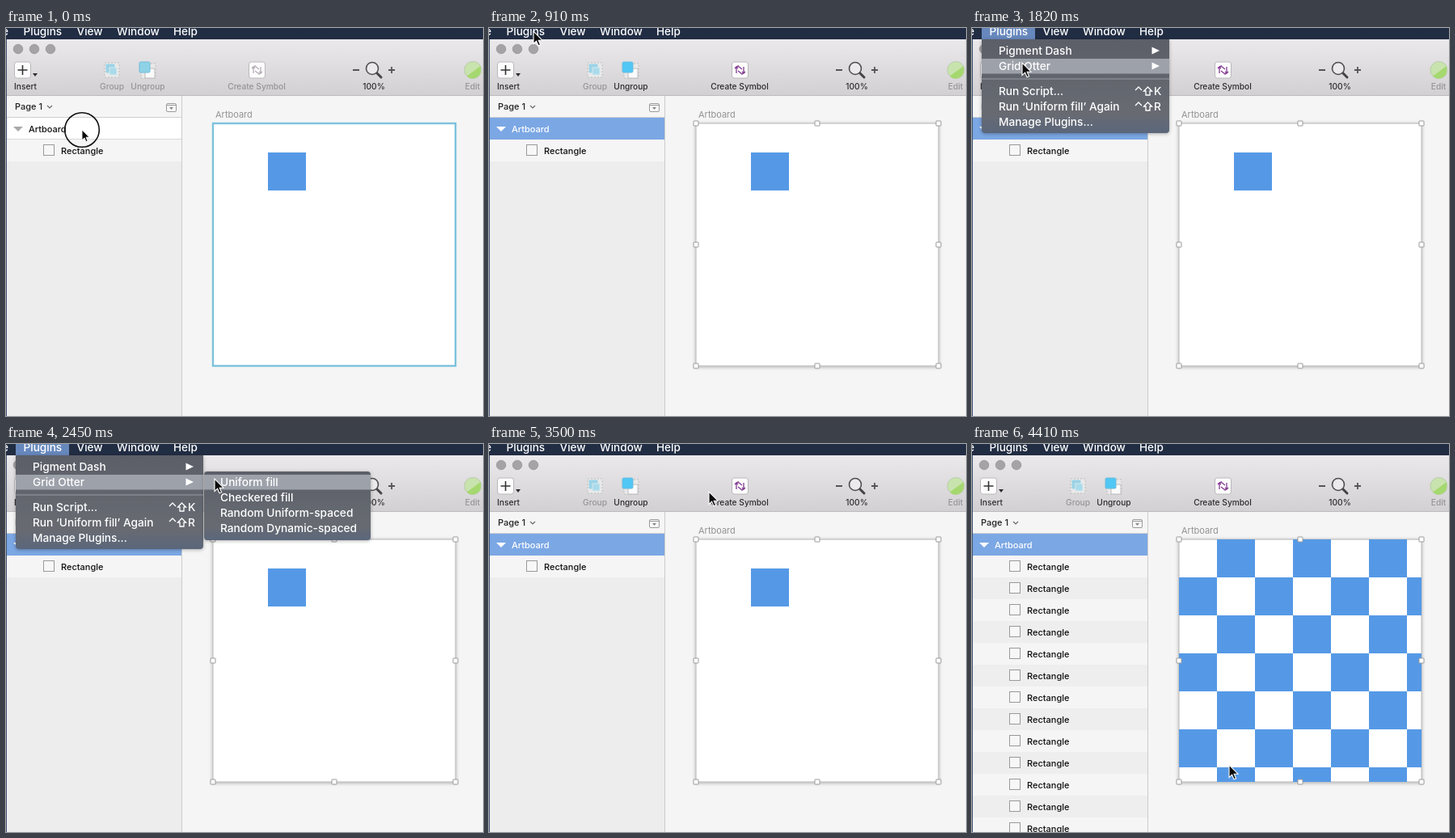
Write an HTML page that moves like this. It is 590 by 480 pixels and loops after 4480 ms.

```html
<!DOCTYPE html>
<html lang="en">
<head>
<meta charset="utf-8">
<title>Checkered fill</title>
<style>
  html, body { margin: 0; width: 100%; height: 100%; overflow: hidden; background: #f5f5f5; }
  svg { display: block; width: 590px; height: 480px; }
  text { font-family: Inter, "Open Sans", sans-serif; white-space: pre; }
</style>
</head>
<body>
<svg id="stage" viewBox="0 0 590 480">
  <defs>
    <linearGradient id="bar" x2="0" y2="1">
      <stop stop-color="#ebe9eb"/><stop offset="1" stop-color="#d2d0d2"/>
    </linearGradient>
    <linearGradient id="glass" x2="0" y2="1">
      <stop stop-color="#5b5f68"/><stop offset=".8" stop-color="#686b72"/>
      <stop offset="1" stop-color="#5a667b"/>
    </linearGradient>
    <filter id="shadow" x="-10%" y="-10%" width="120%" height="125%">
      <feDropShadow dx="0" dy="1" stdDeviation="2" flood-opacity=".3"/>
    </filter>
    <clipPath id="board"><rect x="256" y="118" width="300" height="300"/></clipPath>
  </defs>
  <g id="scene"></g>
</svg>
<script>
const LOOP = 4480, STEP = 70;
const BLUE = '#5599e6';
const SELECT = 140, OPEN = 1190, SUBMENU = 1890, CLOSE = 3290, FILL = 3780;
const pointer = [
  [0, 94, 126], [225, 94, 126], [840, 55, 4], [1540, 55, 4], [1820, 62, 43], [1960, 62, 43],
  [2240, 225, 43], [2450, 258, 43], [2590, 258, 43], [2730, 272, 59], [3570, 272, 59],
  [4130, 318, 397], [LOOP, 318, 397]
];

const rect = (x, y, w, h, fill, more = '') =>
  `<rect x="${x}" y="${y}" width="${w}" height="${h}" fill="${fill}" ${more}/>`;
const path = (d, fill, stroke = 'none', more = '') =>
  `<path d="${d}" fill="${fill}" stroke="${stroke}" ${more}/>`;
const circle = (x, y, r, fill, more = '') =>
  `<circle cx="${x}" cy="${y}" r="${r}" fill="${fill}" ${more}/>`;
const text = (s, x, y, size, fill, more = '') =>
  `<text x="${x}" y="${y}" font-size="${size}" fill="${fill}" ${more}>${s}</text>`;
const label = (s, x, fill) => text(s, x, 76, 10.2, fill, 'text-anchor="middle" font-weight="450"');

function pointerAt(t) {
  const i = pointer.findIndex(k => k[0] > t);
  const [t0, x0, y0] = pointer[i - 1], [t1, x1, y1] = pointer[i];
  const u = (t - t0) / (t1 - t0), e = u * u * (3 - 2 * u);
  return [x0 + (x1 - x0) * e, y0 + (y1 - y0) * e];
}

function menuBar(open) {
  const names = [['e', -5], ['Plugins', 21.5], ['View', 87.5], ['Window', 137], ['Help', 207]];
  return rect(0, 0, 590, 14, '#212d43') + (open ? rect(12, 0, 66, 14, '#6788bd') : '') +
    names.map(([s, x]) => text(s, x, 9, 13.6, '#fff', 'font-weight="500"')).join('');
}

function toolbar(selected) {
  const dim = '#969496', dark = '#2c2c2c', on = selected ? dark : dim;
  const purple = selected ? '#843c94' : '#b5adb7';
  const button = x => rect(x, 42, 20, 20, '#fcfcfc', 'rx="3" stroke="#bab8ba"');
  const corners = (x, y) => rect(x, y, 18, 18, '#e9e9e9', 'stroke="#bdbdbd" stroke-dasharray="2 2"');
  return rect(1, 14, 589, 69, 'url(#bar)') + rect(1, 83, 589, 1, '#bcbabc') +
    [15, 35, 55].map(x => circle(x, 26, 5.8, '#a5a3a5', 'stroke="#929092" stroke-width=".7"')).join('') +
    button(10.5) + path('M14.5 52h12M20.5 46v12', 'none', '#333', 'stroke-width="1.6"') +
    path('M33 56h6l-3 4z', dark) + label('Insert', 24, dark) +
    corners(122, 43) + rect(123.5, 44.5, 11, 11, '#9bd3e6', 'rx="1"') +
    rect(128, 49, 9, 9, '#a9dbeb', 'stroke="#d9e8ed"') + label('Group', 131, dim) +
    corners(167, 44) + rect(172, 50, 12, 12, '#fafafa', 'stroke="#bbb"') +
    rect(165, 42, 13, 13, selected ? '#50c7f5' : '#8ed2e6', 'rx="1.5" stroke="#6ebbdc"') +
    label('Ungroup', 175.5, on) +
    button(300.5) +
    path('M306 56v-6q0-3 3-3M304 50l2-2 2 2M315 48v6q0 3-3 3M313 54l2 2 2-2M308 47l5 4M308 53l5 4',
      'none', purple, 'stroke-width="1.3"') +
    label('Create Symbol', 310, on) +
    path('M429 52h8M473 52h8M477 48v8', 'none', '#555', 'stroke-width="1.8"') +
    path('M458 55l6 6', 'none', '#444', 'stroke-width="3" stroke-linecap="round"') +
    circle(453, 50, 7.5, '#eceaec', 'stroke="#505050" stroke-width="1.6"') + label('100%', 455, dark) +
    circle(577.5, 52, 10.5, '#c9e3ae', 'stroke="#b9cda8"') +
    path('M570 59.5A10 10 0 0 0 587 52V47z', '#a5d86f') + label('Edit', 577, dim);
}

function sidebar(selected, filled) {
  let s = rect(1, 84, 216, 396, '#ededee') + rect(1, 84, 216, 26, '#f5f5f5') +
    rect(1, 110, 216, 1, '#d0d0d0') + text('Page 1', 11, 101, 11, '#222', 'font-weight="450"') +
    path('M51 96l3 3 3-3', 'none', '#666', 'stroke-width="1.2"') +
    rect(198.5, 93.5, 12, 10, '#f8f8f8', 'rx="1.5" stroke="#9a9a9a"') +
    path('M198.5 95.5h12', 'none', '#9a9a9a') + path('M202 98h5l-2.5 3z', '#888') +
    rect(1, 111, 216, 27, selected ? '#7ba7e4' : '#fff') +
    (selected ? '' : rect(1, 137, 216, 1, '#d8d8d8')) +
    path('M9 122h12l-6 6z', selected ? '#fff' : '#a9a9a9') +
    text('Artboard', 28, 129, 11, selected ? '#fff' : '#111', 'font-weight="500"');
  for (let i = 0; i < (filled ? 13 : 1); i++) {
    const y = 138 + 27 * i;
    s += rect(1, y, 216, 27, i % 2 ? '#eeeeee' : '#f5f5f5') +
      rect(46.5, y + 6.5, 13, 13, '#f7f7f7', 'stroke="#999"') +
      text('Rectangle', 68, y + 18, 11, '#111', 'font-weight="500"');
  }
  return s + rect(217, 84, 1, 396, '#cbcbcb');
}

function artboard(selected, filled) {
  let s = text('Artboard', 259, 111, 11, '#929292') +
    rect(256, 118, 300, 300, '#fff', selected ? 'stroke="#b5b5b5" filter="url(#shadow)"'
      : 'stroke="#7dc2dd" stroke-width="2.4"');
  if (filled) {
    s += '<g clip-path="url(#board)">';
    for (let i = 0; i < 49; i++)
      if (i % 2) s += rect(256 + i % 7 * 47, 118 + Math.floor(i / 7) * 47, 47, 47, BLUE);
    s += '</g>';
  } else s += rect(324, 154, 47, 47, BLUE);
  if (selected)
    for (const x of [256, 406, 556])
      for (const y of [118, 268, 418])
        if (x !== 406 || y !== 268)
          s += rect(x - 3, y - 3, 6, 6, '#fff', 'stroke="#999" rx=".5"');
  return s;
}

function menus(t, x, y) {
  const item = (s, x, y) => text(s, x, y + 5, 13.7, '#fff', 'font-weight="500"');
  const light = (x, y, w) => rect(x, y, w, 18.5, '#9da1aa');
  const hover = t >= 1750;
  let s = `<g opacity="${t < CLOSE ? 1 : .5}">` +
    path('M12 14H244V126q0 4-4 4H16q-4 0-4-4z', 'url(#glass)', 'none', 'filter="url(#shadow)"') +
    (hover ? light(12, 38, 232) : '') + rect(12, 62, 232, 2, '#7d8087') +
    item('Pigment Dash', 33, 28) + item('Grid Otter', 33, 47) + item('Run Script...', 33, 78) +
    item('Run ‘Uniform fill’ Again', 33, 97) + item('Manage Plugins...', 33, 116) +
    [28, 47].map(y => path(`M222.5 ${y - 4.5}l9.5 4.5-9.5 4.5z`, '#fff')).join('') +
    [['K', 78], ['R', 97]].map(([key, y]) => item(key, 225, y) +
      path(`M202 ${y - 1}l4-4 4 4M217.5 ${y - 5}l5 5h-2.5v5h-5v-5h-2.5z`, 'none', '#fff',
        'stroke-width="1.3"')).join('');
  if (t >= SUBMENU) {
    s += rect(245, 34, 206, 85, 'url(#glass)', 'rx="4" filter="url(#shadow)"');
    const blink = t >= 3220 && t < CLOSE;
    if (x > 245 && !blink) s += light(245, y < 57 ? 38 : 57, 206);
    ['Uniform fill', 'Checkered fill', 'Random Uniform-spaced', 'Random Dynamic-spaced']
      .forEach((name, i) => s += item(name, 265, 47 + 19 * i));
  }
  return s + '</g>';
}

function cursor(x, y, pressed) {
  return (pressed ? circle(94, 126, 21.3, 'none', 'stroke="#111" stroke-width="1.6"') : '') +
    `<g transform="translate(${x} ${y}) scale(${pressed ? .82 : 1})">` +
    path('M0 0V15.5L3.6 12.2L6 17.8L8.6 16.7L6.2 11.2H11z', '#0b0b0b', '#fff', 'stroke-width="1.1"') + '</g>';
}

function scene(t) {
  const selected = t >= SELECT, filled = t >= FILL, open = t >= OPEN && t < CLOSE + STEP;
  const [x, y] = pointerAt(t);
  return rect(0, 0, 590, 480, '#f5f5f5') + rect(0, 14, 1, 466, '#405575') +
    artboard(selected, filled) + sidebar(selected, filled) + toolbar(selected) +
    menuBar(open) + (open ? menus(t, x, y) : '') + cursor(x, y, !selected);
}

const root = document.getElementById('scene');
const start = performance.now();
let shown = -1;
function tick() {
  const t = Math.floor((performance.now() - start) % LOOP / STEP) * STEP;
  if (t !== shown) root.innerHTML = scene(shown = t);
  requestAnimationFrame(tick);
}
tick();
</script>
</body>
</html>
```
